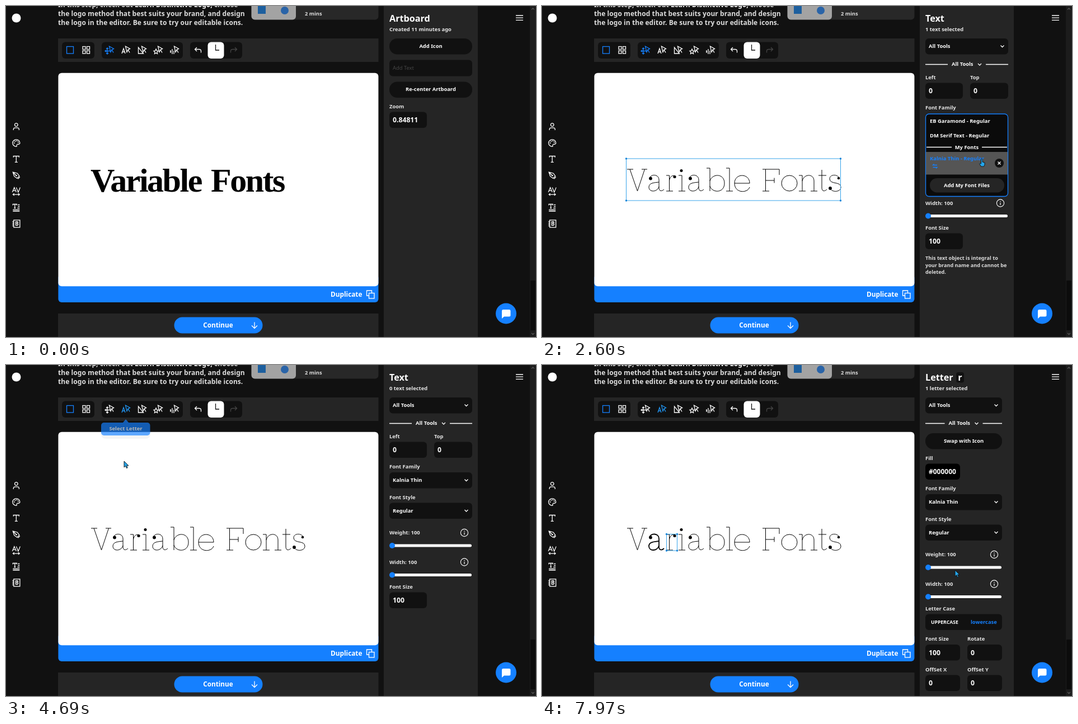
An HTML page that plays this animation: 947 px wide and 592 px high, repeating every 8 s.

```html
<!DOCTYPE html>
<html lang="en">
<head>
<meta charset="utf-8">
<title>Logo editor</title>
<style>
  html, body { margin: 0; width: 100%; height: 100%; overflow: hidden; background: #111; }
  svg { display: block; width: 947px; height: 592px; }
  text { font: 700 9.4px "Noto Sans", "Open Sans", sans-serif; fill: #fff; white-space: pre; }
  .line { fill: none; stroke: #fff; stroke-width: 1.3; }
  .hair { fill: none; stroke: #000; stroke-width: 1; }
  .intro { font-size: 12px; font-weight: 600; letter-spacing: .06px; fill: #ddd; }
  .note { font-size: 9.1px; fill: #ddd; }
  .serif { font: 700 60px "Liberation Serif", serif; letter-spacing: -2.5px; fill: #000; }
</style>
</head>
<body>
<svg id="stage" viewBox="0 0 947 592"></svg>
<script>
const LOOP = 8000, BLUE = '#1580ff', DARK = '#111', PANEL = '#252525', SEL = '#36a3ea';

// Drawing helpers: each returns SVG markup.
const rect = (x, y, x2, y2, fill, r = 0, extra = '') =>
  `<rect x="${x}" y="${y}" width="${x2 - x}" height="${y2 - y}" rx="${r}" fill="${fill}" ${extra}/>`;
const dot = (x, y, r, fill = '#000', extra = '') =>
  `<circle cx="${x}" cy="${y}" r="${r}" fill="${fill}" ${extra}/>`;
const line = (d, extra = '') => `<path class="line" d="${d}" ${extra}/>`;
const at = (x, y, body, extra = '') => `<g transform="translate(${x} ${y})" ${extra}>${body}</g>`;
const group = (id, body) => `<g id="${id}">${body}</g>`;
const text = (x, y, s, { size, fill, mid, cls = '', weight } = {}) =>
  `<text x="${x}" y="${y}" class="${cls}" style="${size ? `font-size:${size}px;` : ''}${fill ? `fill:${fill};` : ''}` +
  `${weight ? `font-weight:${weight};` : ''}"${mid ? ' text-anchor="middle"' : ''}>${s}</text>`;
const label = (x, y, s) => text(x, y, s, { fill: '#e6e6e6' });
const chevron = (x, y) => at(x, y, line('M-3 -1.5L0 1.5L3 -1.5'));
const field = (x, x2, y, s) => rect(x, y, x2, y + 28.5, DARK, 6) + text(x + 6, y + 18.5, s, { size: 12.2 });
const select = (x2, y, s) => rect(685, y, x2, y + 28.5, DARK, 6) + text(691, y + 17, s) + chevron(x2 - 10.5, y + 14);
const pill = (x2, y, s) => rect(685, y, x2, y + 28.5, DARK, 14) + text((685 + x2) / 2, y + 16.5, s, { mid: true });
const note = y => ['This text object is integral to', 'your brand name and cannot be', 'deleted.']
  .map((s, i) => text(685, y + i * 12.5, s, { cls: 'note' })).join('');
const heading = (title, sub) => text(685, 28, title, { size: 16.2 }) + label(685, 44.5, sub);

function slider(x2, y, name, value, pos = 690) {
  const info = at(x2 - 14, y - 23, `<circle class="line" r="6.6" style="stroke-width:1.1"/>` +
    line('M0 -.6V3.4M0 -3.4V-2', 'style="stroke-width:1.2"'));
  const moved = pos > 690;
  return label(685, y - 20, `${name}: ${value}`) + info +
    rect(686, y - 2.5, x2 - 1, y + 2.5, moved ? '#e4e4e4' : '#fff', 2.5) +
    (moved ? rect(686, y - 2.5, pos, y + 2.5, '#155fc0', 2.5) : '') + dot(pos, y, 5, BLUE);
}

function toolsHead(x2) {
  const m = (685 + x2) / 2;
  return select(x2, 58, 'All Tools') + text(m - 27, 107, 'All Tools') + chevron(m + 23, 104.5) +
    line(`M685 104.5H${m - 34}M${m + 34} 104.5H${x2}`);
}

function frameBox(x, y, x2, y2) {
  const ends = [[x, y], [x2, y], [x, y2], [x2, y2]].map(p => dot(...p, 1.7, '#1784d8')).join('');
  return rect(x, y, x2, y2, 'none', 0, `stroke="${SEL}"`) + ends;
}

// Page furniture
function sideIcons() {
  const icons = [
    '<circle class="line" cy="-3.5" r="2.8"/>' + line('M-5 6V4.5Q-5 1.8 -2 1.8H2Q5 1.8 5 4.5V6'),
    line('M0 6.5A6.5 6.3 0 1 1 6.5 0C6.5 3 3 2 1.5 2.6S2 6.4 0 6.5Z') +
      [[-3.5, 0], [-2, -3], [1, -3.6], [3.6, -1.4]].map(p => dot(...p, 1, '#fff')).join(''),
    line('M-5 -3V-5.3H5V-3M0 -5V5.5M-2.5 5.5H2.5'),
    line('M-6 -5.5L2 -3.5L5.5 1.5L1.5 5.5L-3.5 2ZM-6 -5.5L0 .5M3 6.5L6.5 3') + dot(.3, .6, 1.2, '#fff'),
    line('M-7 1.5L-3.5 -7L0 1.5M-5.7 -1.5H-1.3M0 -7L3.5 1.5L7 -7M-6 5.5H6M-3.5 3.5L-6 5.5L-3.5 7.5M3.5 3.5L6 5.5L3.5 7.5',
      'style="stroke-width:1.2"'),
    line('M-6 -4V-6H1V-4M-2.5 -6V1M-4 1H-1M3 -5H6M3 -2H6M2 1H6M-6 4H6M-6 6.5H6'),
    '<rect class="line" x="-4.5" y="-6.5" width="11" height="13"/>' +
      line('M-7 -4H-4M-7 -1.3H-4M-7 1.3H-4M-7 4H-4') + text(1, 3.6, 'B', { mid: true, size: 10 })
  ];
  return icons.map((s, i) => at(18.3, 216 + i * 28.9, s)).join('');
}

const POINTER = '<path class="line" d="M-.5 -7L7.5 -2.500L4 -.700L2 3.500ZM4 -.700L7 4.500" style="stroke:inherit"/>';
const BADGES = [
  'M-4 -4V7M-8 1.5H1M-6 -2L-4 -4L-2 -2M-6 5L-4 7L-2 5M-6 0L-8 1.5L-6 3',
  'M-7 6L-4 -3L-1 6M-6 3H-2', 'M-6.5 -5V6H2.5Z',
  'M-4 -2L-2.8 1L0 1.4L-2 3.4L-1.5 6.5L-4 5L-6.5 6.5L-6 3.4L-8 1.4L-5.2 1Z',
  'M-7 0V5M-4 -2V7M-1 1V7M-8 2.5H-6'
];
const tool = (i, color) => at(185 + i * 29, 79,
  POINTER + `<path class="line" d="${BADGES[i]}" style="stroke:inherit"/>`, `style="stroke:${color}"`);

function toolbar() {
  const grid = [137, 144.5].flatMap(x => [72.5, 80].map(y =>
    `<rect class="line" x="${x}" y="${y}" width="5" height="5"/>`)).join('');
  const back = 'M-2 -5L-5.5 -1.5L-2 2M-5.5 -1.5H2Q5.5 -1.5 5.5 1.5V4.5';
  return rect(93, 58, 665.5, 100, PANEL) +
    [[100, 158], [171, 316], [329, 422]].map(([a, b]) => rect(a, 64.5, b, 94, DARK, 6)).join('') +
    `<rect class="line" x="108.5" y="72.5" width="12" height="12.5" style="stroke:${BLUE}"/>` + grid +
    tool(2, '#fff') + tool(3, '#fff') + tool(4, '#fff') +
    group('toolText', tool(0, BLUE) + tool(1, '#fff')) +
    group('toolLetter', tool(0, '#fff') + tool(1, '#2196f3')) +
    at(343, 79, line(back)) + rect(360.5, 64.5, 389.5, 94, '#fff', 6) +
    line('M374.5 69V79H381', 'style="stroke:#111"') +
    at(407, 79, line(back, 'transform="scale(-1 1)" style="stroke:#444"'));
}

function page() {
  return rect(0, 0, 947, 592, DARK) + rect(936, 0, 947, 592, '#1c1c1c') + rect(937, 491, 946, 580, '#0c0c0c') +
    line('M939 6.5L941.5 4L944 6.5M939 585L941.5 587.5L944 585', 'style="stroke:#555"') +
    dot(18.5, 21.5, 8, '#fff') + line('M911 17H924M911 21.2H924M911 25.4H924') + sideIcons() +
    text(93, 2, 'In this step, check out <tspan style="font-weight:800;fill:#fff">Learn Distinctive Logo,</tspan> choose', { cls: 'intro' }) +
    text(93, 18, 'the logo method that best suits your brand, and design', { cls: 'intro' }) +
    text(93, 33.5, 'the logo in the editor. Be sure to try our editable icons.', { cls: 'intro' }) +
    rect(438.5, -10, 665.5, 24.5, '#282828', 6) + rect(438.5, -10, 518, 24.5, '#a3a3a3', 6) +
    rect(450, 0, 464, 14, '#1d5f9e') + dot(498, 8, 7, '#2a64a8') +
    text(534, 17, '2 mins', { fill: '#ddd' }) + toolbar() +
    rect(93.4, 480, 665.4, 530, BLUE, 6) + rect(93.4, 119.7, 665.4, 501.2, '#fff', 6) +
    text(580, 520, 'Duplicate', { size: 11.8 }) +
    line('M648.5 518H644.5V509H653.5V513') +
    '<rect class="line" x="648.5" y="513.5" width="9.5" height="9.5"/>' +
    rect(93, 550, 665.5, 592, PANEL) + rect(300.5, 556.5, 458.5, 585.5, BLUE, 14.5) +
    text(379, 575, 'Continue', { size: 11.7, mid: true }) + line('M444 565.5V576M439 571.5L444 576.5L449 571.5') +
    rect(675, 0, 843, 592, PANEL) + dot(893.5, 550, 18.5, BLUE) +
    '<path d="M888 543H899Q901.500 543 901.500 545.500V553Q901.500 555.500 899 555.500H890L886 559V545.500Q886 543 888 543Z" fill="#fff"/>';
}

// Hairline lettering: [x, strokes, ball terminals], baseline at 331.
const A = ['M3 309C4 300 20 300 20 311V325C20 331.500 25 332 29 328M20 315C12 316 2 316 2 324C2 333.500 17 333.500 20 323', [[5, 308.5, 2.9]]];
const GLYPHS = [
  [152, 'M0 292H11M26 292H36M5 292L18.500 331L31.500 292'],
  [189, ...A],
  [221, 'M1 303H6.500V331M1 331H13M6.500 312C8 304 13 302 17 304', [[16, 305.5, 2.6]]],
  [243, 'M1 303H7V331M1 331H13', [[6, 294.5, 2.5]]],
  [260, ...A],
  [294, 'M0 290H6V331M6 313C10 299 32 299 32 317C32 335 10 335 6 322'],
  [328, 'M1 290H7V331M1 331H13'],
  [343, 'M1 317H28C28 298.500 1 298.500 1 317C1 335 24 335.500 28 324'],
  [394, 'M0 292H30V302M5.500 292V331M0 331H12M5.500 312H21M21 307.500V316.500'],
  [427, 'M1 317A14 14 0 1 1 29 317A14 14 0 1 1 1 317'],
  [459, 'M0 303H6V331M0 331H12M6 313C9 299.500 27 299.500 27 313V331M21 331H33'],
  [493, 'M7 293V325C7 332 12 332 16 328M1 303H15'],
  [511, 'M20 308C18 300.500 3 300.500 3 309C3 320 23 313 23 324C23 333.500 6 333.500 4 326', [[19, 308, 2.3], [4, 326, 2.9]]]
];
const thinWord = GLYPHS.map(([x, d, balls = []], i) =>
  at(x, 0, `<path class="hair" d="${d}"/>` + balls.map(b => dot(...b)).join(''), `id="glyph${i}"`)).join('');

// Side panels
const artPanel = heading('Artboard', 'Created 11 minutes ago') + pill(833, 58, 'Add Icon') +
  rect(685, 96.5, 833, 125.5, DARK, 6) + text(691, 114, 'Add Text', { fill: '#454545', weight: 500 }) +
  pill(833, 135.5, 'Re-center Artboard') + label(685, 183, 'Zoom') + field(685, 752, 189.5, '0.84811');

const textPanel = group('selected', heading('Text', '1 text selected')) +
  group('unselected', heading('Text', '0 text selected')) + toolsHead(833) +
  label(685, 131, 'Left') + label(765, 131, 'Top') + field(685, 752, 137.5, '0') + field(765, 833, 137.5, '0') +
  label(685, 185, 'Font Family') + label(685, 239.5, 'Font Style') + select(833, 246.5, 'Regular') +
  group('serifPart', select(833, 192, 'DM Serif Text') + label(685, 294, 'Font Size') +
    field(685, 752, 301.5, '100') + note(349)) +
  group('thinPart', select(833, 192, 'Kalnia Thin') + slider(833, 323, 'Weight', 100) +
    slider(833, 375.5, 'Width', 100) + label(685, 399.5, 'Font Size') + field(685, 752, 406.5, '100')) +
  group('thinNote', note(454));

const ring = `stroke="${BLUE}" stroke-width="1.3"`;
const styleList = rect(685.5, 247, 832.5, 300, '#0b0b0b', 6, ring) + rect(686, 248, 832, 273.5, '#555', 5) +
  text(693, 263.5, 'Regular', { fill: BLUE }) + text(693, 289, 'Italic');
const familyList = rect(685.5, 193, 832.5, 340.5, '#0b0b0b', 6, ring) +
  group('rowSerif', rect(686, 219, 832, 244, '#555')) + group('rowThin', rect(686, 261, 832, 301.5, '#555')) +
  text(693, 209, 'EB Garamond - Regular') + text(693, 234.5, 'DM Serif Text - Regular') +
  line('M687 252.500H732M786 252.500H831') + text(759, 255.5, 'My Fonts', { mid: true }) +
  text(693, 276, 'Kalnia Thin - Regular', { fill: BLUE }) +
  line('M706 284.500H698.500L700.500 282.500M698.500 288.500H706L704 290.500', `style="stroke:${BLUE}"`) +
  dot(817, 281, 8, DARK) + line('M814.500 278.500L819.500 283.500M819.500 278.500L814.500 283.500') +
  rect(693, 308, 826, 333.5, PANEL, 12.5) + text(759, 323.5, 'Add My Font Files', { mid: true });

const titleChip = (s, x2) => rect(740, 13, x2, 31.5, DARK, 4) + text((740 + x2) / 2, 28, s, { size: 16.2, mid: true });
const letterPanel = heading('Letter', '1 letter selected') + group('chipA', titleChip('a', 757)) +
  group('chipR', titleChip('r', 754)) + toolsHead(822) + pill(822, 122, 'Swap with Icon') +
  label(685, 170, 'Fill') + rect(685, 176.5, 747, 205, '#000', 6) + text(691, 195, '#000000', { size: 12 }) +
  label(685, 224, 'Font Family') + select(822, 231, 'Kalnia Thin') +
  label(685, 278.5, 'Font Style') + select(822, 285.5, 'Regular') +
  group('light', slider(822, 362, 'Weight', 100)) + group('heavy', slider(822, 362, 'Weight', 205, 712)) +
  slider(822, 414.5, 'Width', 100) + label(685, 438.5, 'Letter Case') + rect(685, 445.5, 822, 474, DARK, 6) +
  text(695, 463, 'UPPERCASE', { size: 8.6 }) + text(766, 463, 'lowercase', { fill: BLUE }) +
  label(685, 493, 'Font Size') + label(760, 493, 'Rotate') + field(685, 747, 500, '100') + field(760, 822, 500, '0') +
  label(685, 547.5, 'OffSet X') + label(760, 547.5, 'OffSet Y') + field(685, 747, 554.5, '0') + field(760, 822, 554.5, '0');

const tip = rect(170, 112, 258, 132, '#000', 8, 'opacity=".06"') + rect(170, 103, 257.5, 126, BLUE, 5) +
  `<path d="M208.500 103.500L214 97L219.500 103.500Z" fill="${BLUE}"/>` + text(214, 116.5, 'Select Letter', { mid: true });

const cursor = group('arrow', '<path d="M0 0V11L2.600 8.700L4.500 12.600L6.300 11.700L4.500 8H8Z" fill="#25a5ea" stroke="#111" stroke-width=".9"/>') +
  group('hand', '<path d="M-1.500 -6Q0 -7.500 1 -6V-1L5 0V4L3.500 7H-1.500L-4.500 2Q-3.500 .500 -1.500 2Z" fill="#25a5ea" stroke="#111" stroke-width=".9"/>');

document.getElementById('stage').innerHTML = page() +
  group('serifWord', text(151, 332, 'Variable <tspan x="366">Fonts</tspan>', { cls: 'serif' })) +
  `<g id="thinWord" role="img" aria-label="Variable Fonts">${thinWord}</g>` +
  group('serifBox', frameBox(150.5, 273.5, 497, 350)) + group('thinBox', frameBox(150.5, 273, 533.5, 348)) +
  group('boxA', frameBox(188.5, 302.5, 218, 332)) + group('boxR', frameBox(222.5, 302.5, 241.5, 332)) +
  group('art', artPanel) + group('textSide', textPanel) + group('styleList', styleList) +
  group('familyList', familyList) + group('letterSide', letterPanel) + group('tip', tip) + group('cursor', cursor);

// Visible from / until, in ms.
const SHOW = {
  art: [0, 950], textSide: [950, 5300], letterSide: [5300, LOOP],
  serifWord: [0, 2450], thinWord: [2450, LOOP], serifPart: [0, 2450], thinPart: [2450, LOOP],
  serifBox: [950, 2450], thinBox: [2450, 4150], thinNote: [2450, 4150],
  selected: [0, 4150], unselected: [4150, LOOP], toolText: [0, 4000], toolLetter: [4000, LOOP],
  styleList: [1610, 1730], familyList: [1790, 3240], rowSerif: [0, 2300], rowThin: [2300, LOOP],
  boxA: [4800, 7450], boxR: [7450, LOOP], chipA: [0, 7450], chipR: [7450, LOOP],
  light: [[0, 6440], [7450, LOOP]], heavy: [6440, 7450],
  tip: [3920, 4800], cursor: [530, LOOP], arrow: [[0, 2150], [3240, LOOP]], hand: [2150, 3240]
};
const PATH = [
  [530, 520, 590], [760, 457, 415], [900, 452, 322], [1000, 452, 320], [1310, 608, 328], [1350, 608, 328],
  [1650, 829, 244], [1850, 826, 205], [2020, 826, 205], [2420, 786, 280], [3170, 786, 280],
  [3410, 655, 328], [3700, 214, 271], [3950, 213, 80], [4450, 213, 80], [4690, 211, 172], [4830, 203, 318],
  [5260, 203, 318], [6020, 711, 362], [6720, 711, 362], [6750, 692, 364], [7400, 236, 312],
  [7560, 236, 312], [7970, 738, 367], [8000, 744, 367]
];

const byId = id => document.getElementById(id);
const shows = Object.entries(SHOW).map(([id, s]) => [byId(id), Array.isArray(s[0]) ? s : [s]]);
const bold = byId('glyph1').firstChild;

function place(t) {
  const i = PATH.findIndex(p => p[0] > t);
  if (i < 1) return [PATH[0][1], PATH[0][2]];
  const [t0, x0, y0] = PATH[i - 1], [t1, x1, y1] = PATH[i];
  const u = (t - t0) / (t1 - t0), e = u * u * (3 - 2 * u);
  return [x0 + (x1 - x0) * e, y0 + (y1 - y0) * e];
}

function draw(t) {
  for (const [el, spans] of shows)
    el.style.display = spans.some(([a, b]) => t >= a && t < b) ? '' : 'none';
  byId('cursor').setAttribute('transform', `translate(${place(t)})`);
  byId('tip').style.opacity = Math.min(1, (t - 3900) / 120, (4800 - t) / 160);
  bold.style.strokeWidth = t < 6440 ? 1 : 1.8;
}

const start = performance.now();
function tick() {
  draw((performance.now() - start) % LOOP);
  requestAnimationFrame(tick);
}
tick();
</script>
</body>
</html>
```
